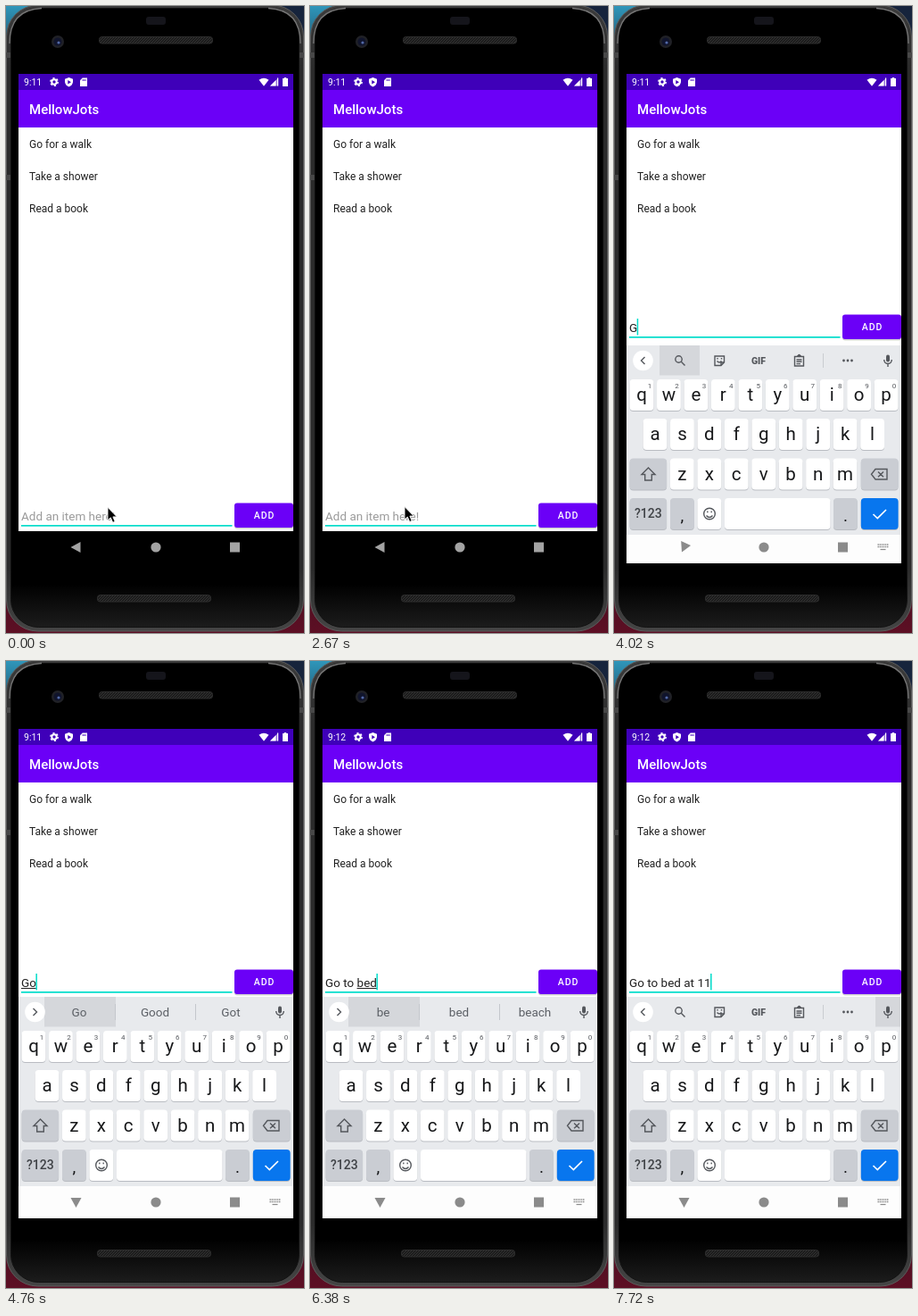
Recreate the animation shown at these times as an HTML page. Size 334x702 px, loop 8 s.

```html
<!DOCTYPE html>
<html lang="en">
<head>
<meta charset="utf-8">
<title>Todo list on a phone</title>
<style>
html, body { margin: 0; width: 100%; height: 100%; overflow: hidden; background: #111; }
svg { display: block; width: 100%; height: 100%; font-family: Roboto, Arial, sans-serif; }
text { white-space: pre; }
.mid { text-anchor: middle; }
.line { fill: none; stroke: #54575c; stroke-width: 1.4; }
</style>
</head>
<body>
<svg viewBox="0 0 334 702">
  <defs>
    <linearGradient id="desk" x2="0" y2="1">
      <stop offset="0" stop-color="#2f96ba"/><stop offset=".08" stop-color="#1d4a62"/>
      <stop offset=".4" stop-color="#23242b"/><stop offset=".85" stop-color="#3a0d1b"/>
      <stop offset="1" stop-color="#5d0f24"/>
    </linearGradient>
    <linearGradient id="metal" x2="0" y2="1">
      <stop offset="0" stop-color="#3c3c3c"/><stop offset=".1" stop-color="#2b2b2b"/>
      <stop offset=".9" stop-color="#2b2b2b"/><stop offset="1" stop-color="#454545"/>
    </linearGradient>
    <linearGradient id="shade" x2="0" y2="1">
      <stop offset=".93" stop-color="#000"/><stop offset="1" stop-color="#1c1c1c"/>
    </linearGradient>
    <pattern id="mesh" width="3" height="3" patternUnits="userSpaceOnUse">
      <rect width="3" height="3" fill="#1b1b1b"/><path d="M0 3L3 0" stroke="#383838" stroke-width=".8"/>
    </pattern>
    <clipPath id="screen"><path d="M14 76H322V624H14Z"/></clipPath>
  </defs>

  <rect width="334" height="702" fill="url(#desk)"/>
  <path d="M300 0H334V90H300Z" fill="#16243c"/>
  <rect x=".5" y="-1" width="333" height="701" rx="35" fill="url(#metal)" stroke="#5c5c5c"/>
  <rect x="5.500" y="2.500" width="323" height="693" rx="31" fill="url(#shade)" stroke="#121212"/>
  <path d="M4 42Q4 4 40 2.500M294 2.500Q330 4 330 42" fill="none" stroke="#767676" stroke-width="1.300"/>
  <path d="M0 52H5V58H0ZM0 189H5V195H0ZM329 52H334V58H329Z" fill="#484848"/>
  <rect x="157" y="12" width="22" height="9" rx="3" fill="#15151b"/>
  <circle cx="58" cy="40" r="7" fill="#202126"/><circle cx="58" cy="40" r="4.5" fill="#10142c"/>
  <circle cx="59" cy="41" r="1.6" fill="#5269a8"/>
  <rect x="104.500" y="34.500" width="127" height="7.500" rx="3" fill="url(#mesh)" stroke="#2d2d2d"/>
  <rect x="102.500" y="659.500" width="127" height="7.500" rx="3" fill="url(#mesh)" stroke="#2d2d2d"/>

  <g clip-path="url(#screen)">
    <rect x="14" y="76" width="308" height="512" fill="#fff"/>
    <rect x="14" y="76" width="308" height="18" fill="#3f00b9"/>
    <rect x="14" y="94" width="308" height="42" fill="#6b00f7"/>
    <g fill="#fff">
      <text id="clock" x="20" y="89" font-size="10.5"></text>
      <circle cx="54" cy="85" r="2.7" fill="none" stroke="#fff" stroke-width="2"/>
      <circle cx="54" cy="85" r="4.2" fill="none" stroke="#fff" stroke-width="1.5" stroke-dasharray="2.2"/>
      <path d="M70.500 80L75 81.800V85Q74.500 89 70.500 90.500Q66.500 89 66 85V81.800Z"/>
      <path d="M69.300 83L73 85.200L69.300 87.400Z" fill="#3f00b9"/>
      <path d="M85.700 80.500H91V90H83V83.200Z"/>
      <path d="M86 82V84M87.600 82V84M89.200 82V84" stroke="#3f00b9" stroke-width=".8"/>
      <path d="M283.500 82.800Q289 78.500 294.500 82.800L289 89.800Z"/>
      <path d="M305 80.500V89.500H296Z" opacity=".45"/>
      <path d="M302.500 83V89.500H296ZM304 80.500H305.200V89.500H304Z"/>
      <path d="M311.800 80H314.200V81H316V90H310V81H311.800Z"/>
      <text x="26" y="121" font-size="15" font-weight="500">MellowJots</text>
    </g>
    <g fill="#212121" font-size="12">
      <text x="26" y="158.500">Go for a walk</text>
      <text x="26" y="194.500">Take a shower</text>
      <text x="26" y="230.500">Read a book</text>
    </g>

    <g id="form">
      <text id="hint" x="17" y="576" font-size="13.5" fill="#9b9b9b">Add an item here!</text>
      <text id="entry" x="17" y="575.500" font-size="13.5" fill="#212121"></text>
      <rect id="under" y="577" height="1" fill="#212121"/>
      <rect x="17" y="581" width="236.500" height="1.700" fill="#00dcca"/>
      <rect id="caret" y="561" width="1.500" height="18.500" fill="#00dcca"/>
      <rect x="256" y="557.500" width="66" height="28" rx="3" fill="#000" opacity=".18"/>
      <rect x="256" y="556.500" width="66" height="27.500" rx="3" fill="#6b00f7"/>
      <text x="289.500" y="574" class="mid" font-size="10.5" font-weight="500" letter-spacing=".94" fill="#fff">ADD</text>
    </g>

    <rect id="navBar" x="14" y="588" width="308" height="36"/>
    <g id="board">
      <rect x="14" y="376" width="308" height="212" fill="#e8eaed"/>
      <rect id="focus" y="376" height="33.500" fill="#d5d7db"/>
      <circle cx="32.500" cy="393" r="11.300" fill="#fff"/>
      <path id="chevron" class="line" d="M34.500 389L30.500 393L34.500 397"/>
      <g id="tools">
        <circle class="line" cx="72.500" cy="391.500" r="3.700"/>
        <path class="line" d="M75.300 394.300L79.500 398.500" stroke-width="2"/>
        <path class="line" d="M113 388H123.500V395L120 398.500H113ZM123.500 395H120V398.500M115.500 393.500Q118 396.500 120.500 393.500M116 390V391.500M120.500 390V391.500"/>
        <text x="162" y="397" class="mid" font-size="10.5" font-weight="900" fill="#54575c">GIF</text>
        <path class="line" d="M202.500 388.500H212.500V399H202.500ZM205 388H210M204.500 392H210.500M204.500 394.300H210.500M204.500 396.600H209"/>
        <circle cx="207.500" cy="387.500" r="1.700" fill="#54575c"/>
        <path d="M234.500 385V401" stroke="#c9ccd1"/>
        <path d="M257.500 393H267" stroke="#54575c" stroke-width="2.800" stroke-linecap="round" stroke-dasharray="0 4.500"/>
      </g>
      <g id="words" font-size="13.5" fill="#5c6066" class="mid">
        <path d="M122.500 384V402M212.500 384V402" stroke="#c4c7cc"/>
        <text x="82" y="398"></text><text x="167" y="398"></text><text x="252" y="398"></text>
      </g>
      <rect x="305" y="386.500" width="4" height="8" rx="2" fill="#54575c"/>
      <path class="line" d="M302.700 392Q303 396.500 307 396.500Q311 396.500 311.300 392M307 396.500V400"/>
      <g id="keys"></g>
      <path class="line" d="M38.500 513L46 520.500H42.300V527H34.700V520.500H31Z"/>
      <path class="line" d="M293 514.500H306V526H293L288.500 520.300ZM296 517.500L302 523.300M302 517.500L296 523.300"/>
      <circle class="line" cx="107" cy="564.500" r="6.300"/>
      <path class="line" d="M103.500 566.500Q107 570.500 110.500 566.500M104.800 561.500V563.300M109.200 561.500V563.300"/>
      <path d="M290.500 565L295.300 569.500L305 560" fill="none" stroke="#fff" stroke-width="1.700"/>
    </g>
    <g id="nav">
      <path id="back" d="M72.500 606L83.500 600V612Z"/>
      <circle cx="168" cy="606" r="5.600"/>
      <path d="M251 600.500H262V611.500H251Z"/>
      <g id="dots">
        <path d="M295.500 603H307.500M295.500 605.500H307.500" stroke-width="1.400" stroke-dasharray="1.400 .7"/>
        <path d="M298.500 608.500H304.500" stroke-width="1.200"/>
      </g>
    </g>
  </g>
  <path id="mouse" d="M0 0V14.500L3.300 11.500L5.700 17L8.200 16L5.900 10.600H10.300Z" fill="#000" stroke="#fff" stroke-width=".9"/>
</svg>
<script>
const LOOP = 8000;
const $ = id => document.getElementById(id);
const set = (el, attrs) => { for (const k in attrs) el.setAttribute(k, attrs[k]); };
const show = (el, on) => set(el, { visibility: on ? 'visible' : 'hidden' });
const at = (table, t) => table.filter(row => row[0] <= t).pop();

// time, x, y
const mousePath = [
  [0, 114, 561.3], [750, 128, 561], [890, 150, 561], [1040, 168, 561], [1190, 179, 561],
  [2230, 263, 655], [2380, 222, 622], [2520, 150, 580], [2670, 106, 560.5]
];
const mouseEnd = 2970;
const blinks = [150, 600, 1190, 1630, 2080, 2670, 3120, 3570];

// time, plain text, underlined text, fresh text, suggestions
const typing = [
  [0, '', '', '', ''],
  [3870, 'G', '', '', ''],
  [4170, '', 'G', '', ''],
  [4460, '', 'G', 'o', ''],
  [4760, '', 'Go', '', 'Go Good Got'],
  [5210, 'Go ', '', '', 'to back for'],
  [5360, 'Go ', '', 't', 'to back for'],
  [5500, 'Go ', 't', 'o', 'to the too'],
  [5650, 'Go ', 'to', '', 'to too town'],
  [5800, 'Go to ', '', '', 'the bed my'],
  [5940, 'Go to ', '', 'b', 'the bed my'],
  [6090, 'Go to ', 'b', 'e', 'be bed by'],
  [6240, 'Go to ', 'be', '', 'be bed beach'],
  [6380, 'Go to ', 'bed', '', 'be bed beach'],
  [6530, 'Go to ', 'bed', '', 'bed beds bedtime'],
  [6830, 'Go to bed ', '', '', 'and at with'],
  [6980, 'Go to bed ', '', 'a', 'and at with'],
  [7130, 'Go to bed ', 'at', '', 'at and as'],
  [7270, 'Go to bed at ', '', '', 'the night my'],
  [7420, 'Go to bed at 1', '', '', 'the night my'],
  [7570, 'Go to bed at 11', '', '', 'the night my'],
  [7720, 'Go to bed at 11', '', '', '']
];

// time, keyboard drop, opacity, back turn
const slide = [[0, 0, 0, 0], [3870, 185, .15, 0], [4020, 4, 1, -65], [4170, 0, 1, -90]];

function add(tag, attrs, label) {
  const el = document.createElementNS('http://www.w3.org/2000/svg', tag);
  set(el, attrs);
  if (label) el.textContent = label;
  $('keys').append(el);
  return el;
}
function key(x, y, w, fill) {
  add('rect', { x, y: y + 1, width: w, height: 35, rx: 4, fill: '#b9bcc2' });
  add('rect', { x, y, width: w, height: 35, rx: 4, fill });
}
function label(x, y, size, str, more) {
  return add('text', { x, y, 'font-size': size, class: 'mid', fill: '#17181a', ...more }, str);
}

const letters = [];
[['qwertyuiop', 31, 414], ['asdfghjkl', 46, 458], ['zxcvbnm', 76.3, 502.5]].forEach(([row, x0, y], r) => {
  [...row].forEach((ch, i) => {
    const x = x0 + i * 30.45;
    key(x - 13.4, y, 26.8, '#fff');
    letters.push([label(x, y + 24, 20.5, ch), ch]);
    if (!r) label(x + 9, y + 9.5, 8, (i + 1) % 10 + '', { fill: '#54575c' });
  });
});
const grey = '#cacdd3';
key(17.6, 502.5, 41.5, grey);
key(276.8, 502.5, 41.8, grey);
[[17.6, 41.5, grey], [63, 26.8, grey], [93.4, 26.8, '#fff'], [124, 118.5, '#fff'],
 [246, 26.8, grey], [276.8, 41.8, '#0876ee']].forEach(([x, w, fill]) => key(x, 547, w, fill));
label(38.3, 569, 14, '?123', { fill: '#3f4246', 'font-weight': 500 });
label(76.4, 573, 19, ',');
label(259.4, 573, 19, '.');

const wordEls = $('words').querySelectorAll('text');
const entry = $('entry');
function widthOf(str) {
  entry.textContent = str;
  return str ? entry.getComputedTextLength() : 0;
}

function render(t) {
  const [, plain, marked, fresh, words] = at(typing, t);
  const [, drop, alpha, turn] = at(slide, t);
  const open = t >= 3870, light = t >= 4020;

  $('clock').textContent = t < 5800 ? '9:11' : '9:12';
  set($('form'), { transform: `translate(0 ${open ? -211 : 0})` });
  show($('hint'), !open);
  const from = 17 + widthOf(plain);
  const to = 17 + widthOf(plain + marked);
  const end = 17 + widthOf(plain + marked + fresh);
  set($('under'), { x: from, width: to - from });
  set($('caret'), { x: end - .5 });
  show($('caret'), open || blinks.filter(b => b <= t).length % 2);

  set($('board'), { transform: `translate(0 ${drop})`, opacity: alpha });
  letters.forEach(([el, ch]) => { el.textContent = light ? ch : ch.toUpperCase(); });
  const list = words ? words.split(' ') : [];
  wordEls.forEach((el, i) => { el.textContent = list[i] || ''; });
  show($('words'), words);
  show($('tools'), !words);
  set($('chevron'), { transform: words ? 'rotate(180 32.5 393)' : '' });
  const [fx, fw] = words ? [43, 80] : t >= 7720 ? [293, 28] : [51, 45];
  set($('focus'), { x: fx, width: fw });
  show($('focus'), light);

  set($('navBar'), { fill: light ? '#fdfdfd' : '#000', y: 588 + (light ? drop : 0) });
  const tint = light ? '#8b8b8b' : '#a3a3a3';
  set($('nav'), { fill: tint });
  set($('back'), { transform: `rotate(${turn} 78.5 606)` });
  set($('dots'), { stroke: tint });
  show($('dots'), open);

  const [, mx, my] = at(mousePath, t);
  set($('mouse'), { transform: `translate(${mx} ${my})` });
  show($('mouse'), t < mouseEnd);
}

const start = performance.now();
function tick() {
  render((performance.now() - start) % LOOP);
  requestAnimationFrame(tick);
}
tick();
</script>
</body>
</html>
```
